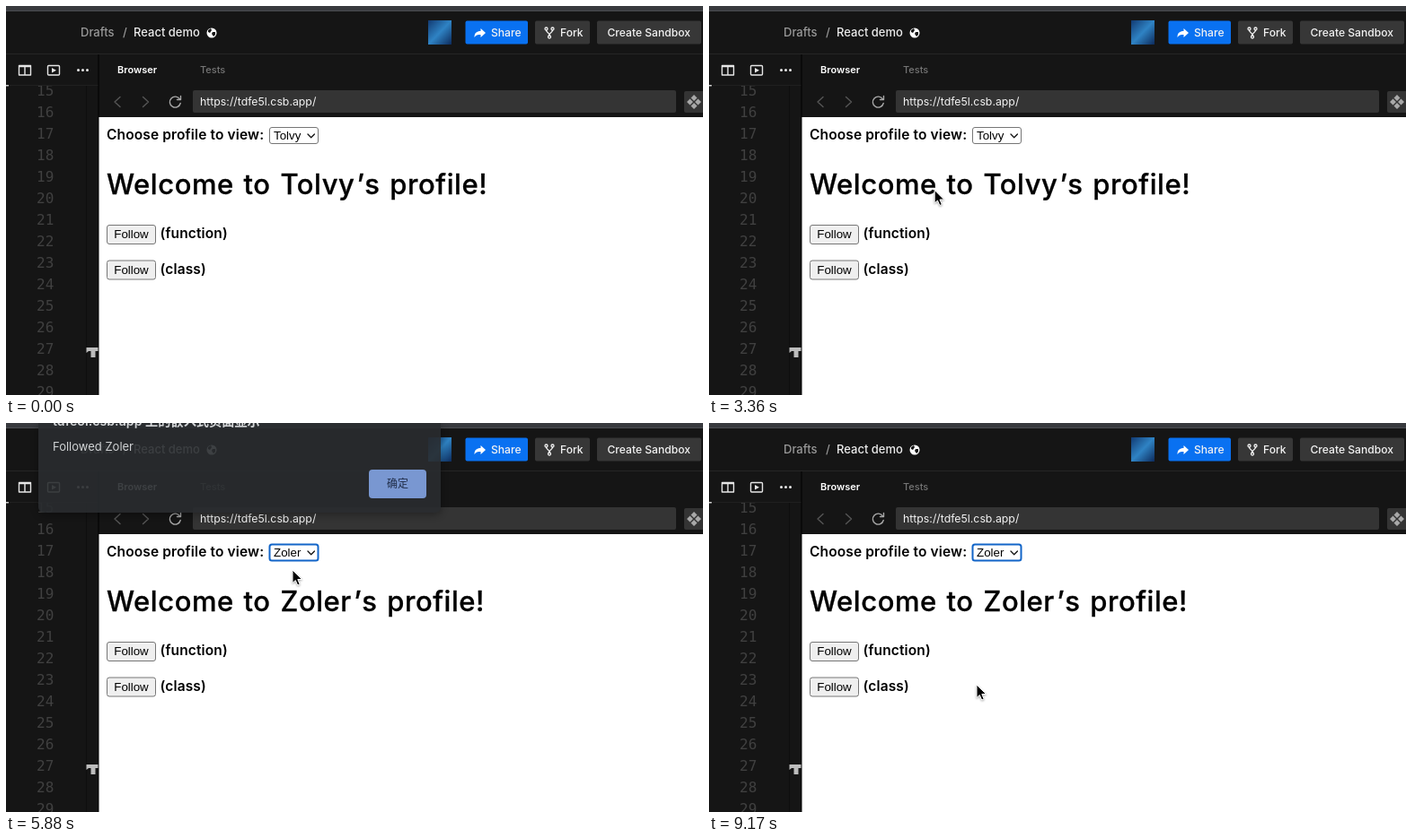
Write an HTML page that moves like this. It is 776 by 434 pixels and loops after 9.31 s.

```html
<!DOCTYPE html>
<html lang="en">
<head>
<meta charset="utf-8">
<title>Profile demo</title>
<style>
  html, body { margin: 0; width: 100%; height: 100%; overflow: hidden; background: #151515; }
  svg { display: block; width: 776px; height: 434px; }
  text { font-family: Inter, "Noto Sans CJK SC", "Noto Sans CJK", sans-serif; white-space: pre; }
  .crumb { font-size: 13px; font-weight: 500; }
  .action { font-size: 12.1px; font-weight: 500; fill: #f2f2f2; }
  .tab { font-size: 11px; font-weight: 500; }
  .label { font-size: 15.5px; font-weight: 600; letter-spacing: .13px; }
  .heading { font-size: 31px; font-weight: 500; letter-spacing: .55px; word-spacing: 2px; stroke: #000; stroke-width: .3px; }
  .control { font: 13.33px "Liberation Sans", Arial, sans-serif; }
  .line { font: 16px "DejaVu Sans Mono", monospace; fill: #404040; }
  .item { font-size: 13px; font-weight: 500; fill: #fff; }
  .stroke { fill: none; stroke-linecap: round; stroke-linejoin: round; }
  #menu { filter: drop-shadow(0 3px 5px rgba(0, 0, 0, .3)); }
  #dialog { filter: drop-shadow(0 2px 5px rgba(0, 0, 0, .4)); }
  #cursor { filter: drop-shadow(0 1px 1px rgba(0, 0, 0, .35)); }
</style>
</head>
<body>
<svg viewBox="0 0 776 434">
  <defs>
    <linearGradient id="portrait" x2="1" y2="1">
      <stop stop-color="#123a72"/><stop offset=".5" stop-color="#2f83c4"/><stop offset="1" stop-color="#0d2b5c"/>
    </linearGradient>
    <linearGradient id="glass" x2="0" y2="1">
      <stop offset=".15" stop-color="#454545"/><stop offset=".4" stop-color="#5a5a5a"/>
    </linearGradient>
    <clipPath id="gutter"><path d="M0 89H104V434H0Z"/></clipPath>
  </defs>

  <rect width="776" height="434" fill="#151515"/>
  <rect width="776" height="5" fill="#383a3e"/>
  <rect y="5" width="776" height="1" fill="#4a4c50"/>
  <rect y="53" width="776" height="1" fill="#262626"/>

  <!-- header -->
  <text class="crumb" x="83" y="34" fill="#999">Drafts</text>
  <text class="crumb" x="130" y="34" fill="#999">/</text>
  <text class="crumb" x="142" y="34" fill="#ececec">React demo</text>
  <circle cx="229" cy="30" r="5.5" fill="#fff"/>
  <path d="M225 27l3-2 1 2-2 3-2-1ZM230 29l3 0 0 3-2 2-2-3Z" fill="#151515"/>
  <rect x="470" y="16" width="26" height="27" fill="url(#portrait)"/>
  <rect x="511.5" y="16.5" width="69.5" height="26" rx="2" fill="#0971f1"/>
  <path d="M521.5 35c0-5 2.5-7 7-7v-3l5.5 5-5.5 5v-3c-3.5 0-5.5.5-7 3Z" fill="#fff"/>
  <text class="action" x="540" y="34">Share</text>
  <rect x="589" y="16.5" width="61" height="26" rx="2" fill="#373737"/>
  <g class="stroke" stroke="#f2f2f2" stroke-width="1.3">
    <circle cx="601.5" cy="25.5" r="1.5"/><circle cx="608.5" cy="25.5" r="1.5"/><circle cx="605" cy="34.5" r="1.5"/>
    <path d="M601.5 27c0 3 3.5 2 3.5 6c0-4 3.5-3 3.5-6"/>
  </g>
  <text class="action" x="617" y="34">Fork</text>
  <rect x="658" y="16.5" width="116" height="26" rx="2" fill="#373737"/>
  <text class="action" x="669.5" y="34">Create Sandbox</text>

  <!-- sidebar -->
  <g class="stroke" stroke="#e6e6e6" stroke-width="1.4">
    <path d="M14.5 66.5h13v10.5h-13ZM21 66.5v10.5M14.5 67.5h13"/>
    <rect x="46.5" y="66.5" width="13" height="10.5" rx="1"/>
  </g>
  <path d="M51 69l5 2.8-5 2.8Z" fill="#e6e6e6"/>
  <g fill="#e6e6e6"><circle cx="80.5" cy="71.5" r="1.5"/><circle cx="85.5" cy="71.5" r="1.5"/><circle cx="90.5" cy="71.5" r="1.5"/></g>
  <rect y="88" width="3" height="1.5" fill="#ccc"/>
  <rect x="3" y="88" width="100" height="1" fill="#202020"/>
  <rect x="89" y="89" width="1" height="345" fill="#0e0e0e"/>
  <g id="lines" clip-path="url(#gutter)"></g>
  <path d="M89.5 381H103V385H99.5V392H94.5V385H92L89.5 387Z" fill="#bdbdbd"/>
  <rect x="102.5" y="54" width="1" height="380" fill="#000"/>

  <!-- browser pane -->
  <text class="tab" x="124" y="75" fill="#fff" style="font-weight:600">Browser</text>
  <text class="tab" x="216" y="75" fill="#757575">Tests</text>
  <g class="stroke" stroke="#555" stroke-width="1.4">
    <path d="M127 101.5l-6 5.5 6 5.5M152.5 101.5l6 5.5-6 5.5"/>
    <path d="M193.5 104a6 6 0 1 0 .7 4.5M194.5 100.5v4h-4" stroke="#a8a8a8"/>
  </g>
  <rect x="208" y="94" width="538" height="25" rx="2" fill="#343434"/>
  <text x="216" y="111" font-size="12.3" fill="#f2f2f2">https://tdfe5l.csb.app/</text>
  <rect x="755" y="95" width="24" height="24" rx="2" fill="#343434"/>
  <path d="M766 99l3.5 3.5-3.5 3.5-3.5-3.5ZM766 108l3.5 3.5-3.5 3.5-3.5-3.5ZM761.5 103.5l3.5 3.5-3.5 3.5-3.5-3.5ZM770.5 103.5l3.5 3.5-3.5 3.5-3.5-3.5Z" fill="#a8a8a8"/>

  <!-- page -->
  <rect x="103.5" y="124" width="673" height="310" fill="#fff"/>
  <text class="label" x="112" y="149">Choose profile to view:</text>
  <rect id="select" x="293.5" y="135.5" width="54" height="18" rx="2.5" fill="#fff"/>
  <text class="control" x="298" y="149" data-name></text>
  <path class="stroke" d="M336 143l3.7 3.7 3.7-3.7" stroke="#111" stroke-width="1.3"/>
  <text class="heading" x="112" y="210">Welcome to <tspan data-name></tspan><tspan dx="2">’</tspan><tspan dx="2">s profile!</tspan></text>
  <g id="buttons"></g>
  <text class="label" x="171.5" y="259">(function)</text>
  <text class="label" x="171.5" y="299">(class)</text>

  <g id="menu">
    <rect x="285.5" y="106.5" width="73.5" height="76" rx="6.5" fill="url(#glass)" stroke="#777"/>
    <rect id="highlight" x="290" width="64" height="22" rx="4" fill="#3f82ee"/>
    <path class="stroke" d="M295.5 145.5l2.5 3 5-7.5" stroke="#fff" stroke-width="1.6"/>
    <g id="items"></g>
  </g>

  <g id="dialog">
    <path d="M36 0H484V94a6 6 0 0 1-6 6H42a6 6 0 0 1-6-6Z" fill="#292c2f"/>
    <text x="52" y="2.5" font-size="14.2" font-weight="600" fill="#e4e6e8">tdfe5l.csb.app 上的嵌入式页面显示</text>
    <text x="52" y="31" font-size="13" fill="#e4e6e8">Followed <tspan data-name></tspan></text>
    <rect x="404" y="52" width="64" height="32" rx="4" fill="#84a6e6"/>
    <text x="424" y="72" font-size="12" font-weight="500" fill="#22304f">确定</text>
  </g>

  <path id="cursor" d="M0 0V14.5L3.3 11.5L5.7 17L8.2 16L5.8 10.5H10.5Z" fill="#000" stroke="#fff" stroke-width="1"/>
</svg>

<script>
const LOOP = 9310, TICK = 70;
const NAMES = ["Jolk", "Tolvy", "Zoler"];
const $ = id => document.getElementById(id);
const set = (el, attrs) => { for (const key in attrs) el.setAttribute(key, attrs[key]); return el; };

function add(parent, tag, attrs, text = "") {
  const el = set(document.createElementNS("http://www.w3.org/2000/svg", tag), attrs);
  el.textContent = text;
  parent.append(el);
  return el;
}

for (let n = 15; n <= 29; n++) {
  add($("lines"), "text", { class: "line", x: 34, y: 99.6 + (n - 15) * 24 }, n);
}

NAMES.forEach((name, i) => add($("items"), "text", { class: "item", x: 309, y: 127 + i * 22 }, name));

const [, classButton] = [244.5, 284].map(y => {
  const box = add($("buttons"), "rect", { x: 112.5, y, width: 54, height: 21, rx: 2.5, fill: "#efefef", stroke: "#767676" });
  add($("buttons"), "text", { class: "control", x: 139.5, y: y + 14.8, "text-anchor": "middle" }, "Follow");
  return box;
});

// Pointer legs: start, end, destination x, y
const LEGS = [
  [280, 350, 381, 412], [350, 490, 340, 288], [630, 980, 206, 298], [1050, 1680, 143, 300],
  [2030, 2450, 133.5, 299], [2800, 3780, 326, 146], [4060, 4130, 323, 143], [4130, 4410, 320.5, 160],
  [5320, 5390, 319, 164], [6300, 7280, 453, 78], [7490, 7700, 421, 68], [8470, 8680, 298, 292]
];

const ease = p => (1 - Math.cos(Math.PI * p)) / 2;
const within = (t, from, to) => t >= from && t < to;
const ramp = (t, from, to) => Math.min(1, Math.max(0, (t - from) / (to - from)));

function pointer(t) {
  let [, , x, y] = LEGS[0];
  for (const [from, to, endX, endY] of LEGS) {
    if (t < from) break;
    const p = ease(ramp(t, from, to));
    x += (endX - x) * p;
    y += (endY - y) * p;
  }
  return [x, y];
}

function buttonStyle(t) {
  if (within(t, 2450, 2590)) return { fill: "#f6f6f6", stroke: "#8d8d8d" };
  if (within(t, 2590, 2940)) return { fill: "#e5e5e5", stroke: "#4f4f4f" };
  return { fill: "#efefef", stroke: "#767676" };
}

function draw(now) {
  const t = Math.floor((now % LOOP) / TICK) * TICK;
  const [x, y] = pointer(t);
  const switched = t >= 5040;

  set($("cursor"), { transform: `translate(${x} ${y})`, opacity: t >= 350 ? 1 : 0 });
  document.querySelectorAll("[data-name]").forEach(el => { el.textContent = NAMES[switched ? 2 : 1]; });
  set($("select"), switched
    ? { stroke: "#1265c8", "stroke-width": 2 }
    : { stroke: "#767676", "stroke-width": 1 });
  set(classButton, buttonStyle(t));

  set($("menu"), { opacity: within(t, 3850, 5040) ? 1 - ramp(t, 4770, 5020) : 0 });
  set($("highlight"), { y: y > 155.5 ? 155.5 : 133, opacity: t === 4550 ? 0 : 1 });

  const shown = t < 5880 ? 0 : t < 5950 ? 0.9 : 1 - ramp(t, 8150, 8330);
  set($("dialog"), { opacity: shown });
}

let start;
function frame(now) {
  start ??= now;
  draw(now - start);
  requestAnimationFrame(frame);
}
draw(0);
requestAnimationFrame(frame);
</script>
</body>
</html>
```
